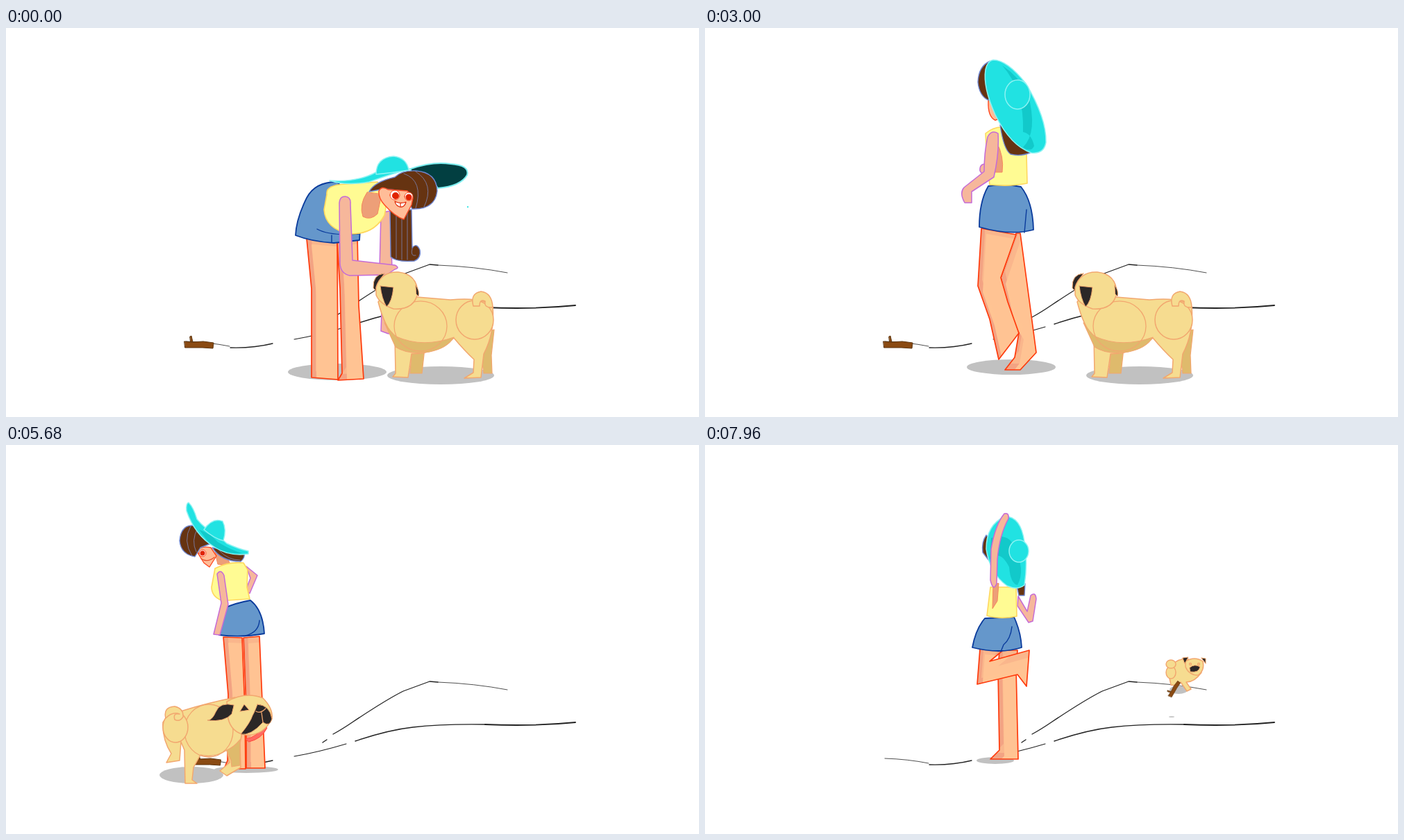
Animation of 998x561 px, one loop 8000 ms. Source, as an HTML page:

```html
<!DOCTYPE html>
<html lang="en">
<head>
<meta charset="utf-8">
<title>Fetch</title>
<style>
html, body { margin: 0; width: 100%; height: 100%; overflow: hidden; background: #fff; }
svg { display: block; width: 100vw; height: 100vh; }
path { stroke-linejoin: round; stroke-linecap: round; }
</style>
</head>
<body>
<svg id="stage" viewBox="0 0 998 561">
  <g id="ground" fill="none" stroke="#222"></g>
  <g id="cast"></g>
</svg>
<script>
const LOOP = 8000, STEP = 40, SAMPLES = 48;
const NS = "http://www.w3.org/2000/svg";
const oval = (x, y, rx, ry = rx) =>
  `M${x - rx},${y}a${rx},${ry} 0 1 1 ${2 * rx},0a${rx},${ry} 0 1 1 ${-2 * rx},0Z`;

// part name -> [fill, stroke, width, anchor part for loose details]
const STYLE = {
  shadow: ["#c1c1c1"],
  leg: ["#ffc493", "#ff3a0c", 1.7],
  shorts: ["#6597cb", "#0a3b9c", 1.8],
  shirt: ["#fffb93", "#ffd75e", 1.6],
  arm: ["#f6b79b", "#c56bd6", 1.5],
  skin: ["#ed9f78", "#f58a5c", 1],
  face: ["#ffbd98", "#ff4a22", 1.4],
  hair: ["#663311", "#6f86cf", 1.4],
  under: ["#023f41", "#7deef0", 2],
  brim: ["#21e2e2", "#8cf3f3", 1.5],
  tint: ["#12c9ca", "none", 0, "brim"],
  crown: ["#21e2e2", "#8cf3f3", 1.5],
  eyes: ["#fff", "#ff4a22", 1, "face"],
  pupils: ["#e02400", "none", 0, "face"],
  lids: ["none", "#e8502c", 1.3, "face"],
  teeth: ["#fff", "#e02400", 1.2, "face"],
  seam: ["none", "#0a3b9c", 1.4, "shorts"],
  strand: ["none", "#7d86b8", .8, "hair1"],
  lock: ["none", "#7d86b8", .8, "hair2"],
  fur: ["#f6dc90", "#f2a76f", 1.5],
  dim: ["#dfba6c", "#f2a76f", 1.2],
  fold: ["none", "#f2a76f", 1.3],
  black: ["#2b2727", "#f2a76f", 1],
  ear: ["#2b2727", "#f2a76f", 1],
  tongue: ["#ff6a62", "#ff4a3a", 1]
};

const pet = {
  ref: [477, 500],
  shadow: oval(477, 496, 71, 12),
  arm1: "M540,266L538,347L556,347L553,264Z",
  leg1: "M433,304L440,376L440,504L478,507L477,308Z",
  leg2: "M477,310L481,376L484,498L478,508L515,506L508,400L506,300Z",
  shorts: "M476,222Q445,222 433,245Q418,275 417,299Q440,308 472,310L509,306L510,290L480,225Z",
  seam: "M448,290Q466,300 508,297M469,299V309",
  hair2: "M553,262L554,330Q562,338 588,336Q598,332 596,320Q591,309 585,317L584,262Z",
  lock: "M562,265V332M570,265V334M578,265V334M585,318Q582,330 590,328",
  shirt: "M462,240Q460,226 490,225L535,222Q552,245 545,270Q530,298 495,297Q460,290 458,262Z",
  skin: "M520,237Q508,255 514,272Q525,278 535,268L541,240Z",
  arm2: "M480,252Q481,242 489,243Q497,244 496,254L499,335L560,342Q568,346 560,348L548,356L495,357Q482,354 481,340Z",
  under: "M583,203Q615,192 640,196Q668,198 664,212Q655,228 622,231Q610,212 583,207Z",
  hair1: "M523,236Q530,222 560,215Q570,205 590,206Q620,208 621,235Q618,262 585,261L570,235L545,232Z",
  strand: "M573,210Q602,220 590,260M590,207Q618,225 602,258",
  face: "M537,235Q541,227 550,233L578,235L586,245L584,255L573,276Q560,272 545,255Q536,245 537,235Z",
  eyes: oval(560, 241, 7) + oval(580, 243, 6),
  pupils: oval(561, 242, 5) + oval(580, 244, 4.5),
  teeth: "M560,250Q567,254 576,251Q574,259 567,258Q561,256 560,250ZM568,253V258",
  brim: "M466,220Q505,223 533,208L582,203Q550,212 523,222Q490,228 466,220Z",
  crown: "M533,211Q533,187 558,185Q577,187 580,205Q555,209 533,211Z"
};

const stand = {
  ref: [477, 500],
  shadow: oval(477, 496, 71, 12),
  crown: "M464,82Q478,68 491,84Q497,100 489,108Q478,95 464,82Z",
  under: "M396,72Q398,54 425,57Q462,64 487,97Q512,135 513,162Q510,180 497,177Q482,172 478,140L470,95Q440,75 410,79Q398,82 396,72Z",
  hair2: "M442,130L440,152L482,154L482,105L470,95Z",
  lock: "M474,122V152M448,138V152",
  skin: "M454,125L453,160Q460,178 469,166L468,122Z",
  leg1: "M433,296L441,380L443,476L427,494L474,494L478,480L468,380L464,300Z",
  leg2: "M464,300L478,400L481,483L465,503L519,503L508,380L504,296Z",
  shorts: "M441,236Q465,243 491,239Q508,262 516,291Q490,300 462,299Q438,297 419,289Q424,258 441,236Z",
  seam: "M451,241L450,262L458,263L459,242M443,260Q446,283 460,289L463,299",
  shirt: "M440,153Q448,148 453,152Q455,172 462,172Q470,170 469,152L480,153Q478,185 482,200L495,212L494,228Q470,237 440,231L430,224L430,190Q435,170 440,153Z",
  arm1: "M480,154Q490,155 497,180L512,215L528,263L548,256Q557,259 552,267Q540,275 524,276L505,225Q488,185 480,154Z",
  arm2: "M437,156Q445,150 441,162Q430,185 421,205L400,250Q397,258 390,257L379,243Q380,236 386,240L392,244L412,205Q424,175 437,156Z",
  hair1: "M391,105Q392,78 420,75Q450,78 468,92Q480,97 478,108L440,110Q428,131 412,131Q393,128 391,105Z",
  strand: "M418,76Q395,100 408,130M434,79Q418,100 426,126",
  face: "M432,108Q440,93 466,94L470,108Q484,110 481,120Q476,126 470,120L455,134L440,140Q430,140 432,132Z",
  lids: "M435,108Q440,98 446,107M435,111Q440,116 445,110M454,107Q460,100 466,108M454,112Q460,117 466,111M445,108L443,115H448",
  pupils: "M440,119Q445,122 449,119Q446,125 440,119Z"
};

const walk = {
  ref: [441, 490],
  shadow: oval(441, 489, 64, 11),
  leg2: "M448,296L426,360L440,420L452,440L446,475L432,493L454,493L477,468L468,400L454,296Z",
  leg1: "M398,289L393,372L410,420L423,478L452,440L436,395L426,360L448,298Z",
  face: "M408,105Q407,128 418,133L425,130L422,98Z",
  hair1: "M410,48Q394,55 393,78Q395,98 408,104L425,90Z",
  arm1: "M404,196Q395,196 396,206Q400,214 408,208Z",
  shorts: "M408,228Q430,224 455,229Q472,250 473,291Q440,300 395,287Q395,250 408,228Z",
  seam: "M460,295L463,262",
  shirt: "M404,152Q415,143 427,143L440,170L463,182L464,224Q440,229 410,226L406,190Z",
  skin: "M420,165Q431,185 428,208L416,208Z",
  hair2: "M425,140Q430,175 440,182Q455,186 470,179L472,150Z",
  arm2: "M407,157Q413,146 422,152Q424,180 416,215L384,236L384,252L374,252Q366,238 373,230L402,207Q402,180 407,157Z",
  brim: "M415,46Q435,46 462,80Q492,130 491,165Q488,182 470,180Q440,170 418,125Q400,85 404,60Q407,47 415,46Z",
  tint: "M428,54Q460,90 458,150Q470,152 474,170Q470,180 458,172Q480,150 465,95Q452,70 428,54Z",
  crown: oval(450, 96, 18, 21)
};

const look = {
  ref: [341, 466],
  shadow: oval(346, 468, 46, 5),
  leg1: "M313,277L320,360L319,455L314,467L345,467L344,380L340,278Z",
  leg2: "M342,278L346,380L346,466L373,466L369,370L365,276Z",
  skin: "M308,138L318,163L332,168L326,145Z",
  hair2: "M313,125L327,160Q340,175 352,165L351,158Q335,145 313,125Z",
  lock: "M322,140Q330,162 345,169",
  shorts: "M315,235Q330,228 352,224Q370,238 372,272Q340,278 307,274Q308,250 315,235Z",
  seam: "M365,253Q364,270 345,275",
  shirt: "M308,165Q316,158 322,165L346,168L348,190L344,212L351,224L314,234L305,220Q303,190 308,165Z",
  arm2: "M308,170Q313,164 321,172Q338,188 351,204L328,232Q320,244 314,241Q310,236 322,222L334,205L315,190Q306,180 308,170Z",
  face: "M288,118Q293,112 303,117L315,128L316,138Q305,150 297,152L291,147L290,135Z",
  eyes: oval(295, 128, 5.5),
  pupils: oval(295, 128, 3.8),
  lids: "M291,141L297,139M308,126Q314,122 313,131",
  hair1: "M259,112Q262,93 281,93Q298,98 310,118L292,121Q290,138 276,138Q260,132 259,112Z",
  strand: "M277,94Q262,115 276,137M287,97Q276,115 286,133",
  brim: "M265,75Q280,84 300,92Q325,95 336,103Q338,125 345,138L352,158Q340,155 318,133Q300,110 280,96Q265,84 265,75Z",
  tint: "M292,102Q320,112 348,152Q330,145 314,128Z",
  crown: "M305,98Q318,90 330,95Q338,103 336,118Q320,115 305,98Z"
};

const peek = {
  arm1: "M346,175L362,188L351,214L345,210L352,192Z",
  ...look,
  skin: "M301,155L305,172L324,174L315,155Z",
  hair2: "M297,148Q310,168 338,168Q345,162 343,155Z",
  lock: "M308,153Q320,166 337,166",
  shirt: "M301,178Q320,168 342,170L348,180L347,205L351,222L320,224L310,224Q296,218 296,205Z",
  arm2: "M304,186Q309,178 314,188L320,230L308,274L299,273L310,228Z",
  face: "M274,152Q282,145 295,148L303,160L293,176L285,170L280,162Z",
  eyes: oval(283, 156, 5),
  pupils: oval(283, 156, 3.5),
  lids: "M281,164Q290,170 300,162",
  hair1: "M250,138Q252,116 268,116Q285,120 295,142L280,148L272,161Q252,158 250,138Z",
  strand: "M266,117Q254,138 268,160M276,120Q266,138 274,154",
  brim: "M263,83Q270,90 275,107Q287,122 300,126L318,142Q335,150 349,153L349,157Q320,161 300,147Q272,130 260,95Q259,84 263,83Z",
  tint: "M278,122Q295,128 305,140Q325,152 340,156Q310,158 290,138Z",
  crown: "M285,122Q298,104 312,110Q318,122 313,138Q300,135 285,122Z"
};

const bend = {
  ref: [384, 460],
  shadow: "M316,467Q340,455 450,453Q430,465 352,468Q320,471 316,467Z",
  arm1: "M356,269L382,268L380,276L362,277Z",
  leg1: "M371,312L330,451L317,455L352,467L400,323Z",
  leg2: "M409,322L421,444L412,453L452,453L437,320Z",
  skin: "M358,268Q372,272 378,282L370,308L355,300Z",
  shorts: "M385,262Q405,246 425,259Q434,272 436,320L404,326L367,308Q375,280 385,262Z",
  seam: "M404,326L407,309L412,304",
  hair2: "M310,305L340,328L330,368Q320,377 293,374L303,335Z",
  hair1: "M300,308L320,290L330,300L322,318L296,350Q285,345 288,335Z",
  strand: "M320,295L296,346",
  lock: "M324,318L308,372M332,324L320,372M275,362Q285,358 290,368Q285,377 276,370Z",
  shirt: "M322,280L342,266L360,261L361,270Q372,290 372,318Q355,324 345,320Q325,310 322,280Z",
  brim: "M313,237Q325,240 326,265Q325,285 318,290Q300,310 285,335L266,371Q258,350 272,325Q285,300 304,285Q308,270 305,250Q306,238 313,237Z",
  crown: "M300,292Q308,282 318,288Q324,300 316,308Q304,308 300,292Z",
  arm2: "M338,298Q342,289 350,295Q352,300 347,308L331,343L314,380Q314,390 306,391Q300,388 304,375Z"
};

const thrown = {
  ref: [418, 453],
  shadow: oval(418, 455, 27, 5),
  leg2: "M422,325L424,440L411,453L451,453L448,322L450,296H424Z",
  leg1: "M396,294L392,345L450,331L463,348L467,296L410,312L428,297Z",
  arm1: "M451,218L464,240L469,217Q476,211 477,222L472,254L466,256L450,232Z",
  hair1: "M405,130Q398,140 400,155L410,168L415,140Z",
  hair2: "M449,203L452,217L460,217L461,200Z",
  shorts: "M403,250L445,248Q455,270 456,292Q425,302 385,292Q390,265 403,250Z",
  seam: "M442,262Q440,280 430,288L426,298",
  shirt: "M411,205L448,205L449,247Q425,252 406,246Z",
  skin: "M415,200L414,236L421,225L423,200Z",
  brim: "M432,103Q455,103 460,140Q465,170 460,202Q450,210 435,203Q410,185 405,150Q405,115 432,103Z",
  tint: "M412,134Q440,126 446,150Q462,180 450,202Q440,200 438,176Q425,150 410,165Z",
  crown: oval(452, 153, 14, 16),
  arm2: "M431,99Q438,97 437,106Q424,130 421,165L420,200Q415,212 411,195L412,150Q418,115 431,99Z"
};

const windup = {
  ...thrown,
  ref: bend.ref, shadow: bend.shadow, leg1: bend.leg1, leg2: bend.leg2,
  arm2: "M414,206Q424,210 416,219L330,198L250,152Q240,142 252,141L335,184Z"
};

const dogIdle = {
  ref: [626, 503],
  shadow: oval(626, 501, 77, 13),
  dim1: "M585,455L582,498L599,498L603,462Z",
  dim2: "M680,440L688,498L700,498L699,472L703,435Z",
  black: "M545,354Q528,355 529,375L538,385Q535,365 545,354Z",
  fur1: "M536,395Q545,430 560,447L561,498L557,503L579,504L584,470Q620,470 645,447Q660,465 674,478L673,497L660,505L684,504L688,470Q704,440 701,402Q690,388 640,392L592,388L560,365Z",
  dim3: "M545,425Q555,440 562,445Q600,462 645,446Q635,462 610,467Q580,472 561,460Z",
  fold1: oval(597, 430, 38, 36),
  fur2: oval(675, 421, 27, 28),
  fur3: "M673,401Q668,383 684,380Q700,382 701,403Q688,404 690,394Q682,390 682,401Z",
  fur4: "M533,374Q540,351 565,352Q592,355 593,382Q588,407 558,405Q538,398 533,385Z",
  ear: "M539,372L558,374Q556,395 548,402Q541,390 539,372Z",
  ear2: "M590,371Q596,379 594,387L591,384Z"
};

const wavy = "q-6,9 0,17q-6,9 0,17q-6,9 0,17q-5,9 0,17";
const dogBow = {
  ref: [626, 503],
  shadow: oval(630, 501, 74, 13),
  dim2: `M692,400${wavy}l3,22l-12,6l-2,-14Z`,
  fur1: "M645,395Q668,395 668,410Q660,440 662,470Q645,495 610,495L575,492L588,440Q615,415 632,415Z",
  fur5: `M688,402${wavy}q0,14 -7,20l3,12h-18l8,-16q-6,-8 0,-18q-6,-8 0,-16q-5,-8 -2,-18q-5,-12 4,-30Z`,
  dim3: "M662,425Q658,470 645,483Q625,497 604,490Q640,468 662,425Z",
  fur2: oval(673, 386, 25, 24),
  fur3: "M649,377Q638,380 635,370Q637,355 662,354Q690,358 697,376L690,385L664,384Q644,362 649,377Z",
  fur4: "M560,450Q562,432 578,429Q598,428 606,440Q608,468 592,482Q570,488 560,470Z",
  fold1: "M602,430Q582,445 588,480Q586,450 602,430Z",
  black: "M555,450L561,456Q570,472 566,483L557,480Z",
  fur6: "M557,501Q570,487 592,478Q612,462 622,462Q605,482 592,493Q580,501 557,501Z"
};

const dogSniff = {
  ref: [212, 460],
  shadow: oval(212, 458, 55, 8),
  fur1: "M152,385Q160,376 180,378Q215,392 236,412L250,420L245,448L228,450Q222,446 200,430L192,428Q180,430 168,452L160,462L146,462L152,447Q158,430 151,410Z",
  dim3: "M192,428Q205,434 216,446L204,454L230,456L240,435L220,420Z",
  fur2: oval(170, 398, 18, 19),
  fur3: "M160,384Q156,371 170,369Q182,371 180,381Q170,384 172,376Q164,376 166,383Z",
  fur4: "M233,425Q240,412 258,415Q272,420 273,440Q270,458 252,460Q235,455 233,440Z",
  black: "M242,450Q255,443 267,458L255,461Q245,460 242,450Z",
  ear: "M250,430Q262,426 264,420Q270,428 267,432Z"
};

const dogRun = {
  ref: [300, 488],
  shadow: oval(267, 476, 46, 12),
  fur1: "M226,400Q235,385 255,383Q290,372 330,364Q345,400 337,430L338,465L318,477L308,470L322,458L318,440Q300,452 280,447L270,465L268,483L275,488L258,488L257,440L252,428L250,455L231,458L238,445Q225,425 226,400Z",
  dim3: "M318,440Q328,436 337,425L337,462L325,464L324,455Z",
  fold1: oval(292, 412, 35, 38),
  fur2: oval(244, 407, 18, 22),
  fur3: "M230,394Q226,378 243,377Q256,380 255,392Q250,400 243,396Q240,386 250,388Q240,384 230,394Z",
  tongue: "M345,424Q362,422 372,403L376,408Q368,424 350,428Z",
  fur4: "M318,370Q345,355 370,365Q385,380 383,395Q370,420 345,418Q325,415 320,395Z",
  black: "M362,374Q380,375 383,395Q380,407 370,400Q352,420 338,417Q352,400 355,390Q358,385 362,374Z",
  fold2: "M360,384Q366,388 374,380M368,386L370,400",
  ear: "M328,375Q308,370 302,385Q297,397 290,397Q315,400 325,388Z",
  ear2: "M337,384L343,374L350,382Z"
};

const dogFar = {
  ref: [682, 353],
  shadow: oval(682, 353, 13, 6),
  fur1: "M672,318Q680,308 695,308L715,328Q705,342 693,342L700,352L694,355L685,342L680,347L671,346L668,332Z",
  fur2: oval(671, 328, 7, 9),
  fur3: oval(671, 316, 7, 6),
  fur4: "M692,312Q705,304 717,312Q720,325 710,332Q697,332 692,320Z",
  black: "M698,321Q705,315 713,320Q711,329 699,327Z",
  ear: "M688,307L696,306L691,315Z",
  ear2: "M715,307L721,308L721,315Z",
  fold1: oval(699, 316, 1.5),
  fold2: oval(711, 316, 1.5)
};

// [time, pose, dx, dy, scaleX, scaleY, overshoot]
const girlKeys = [
  [0, pet], [160, pet, 0, 0, 1, 1, 1.6], [940, stand], [1100, stand, 0, -1], [1200, stand], [1400, stand],
  [1720, stand, 0, 2], [2000, stand], [2240, stand], [2640, walk, 16, 5], [2960, walk], [3120, walk],
  [3500, look, 46, 12, 1.06, 1.06], [3900, walk, -62, -10, .94, .94], [4360, look], [5400, look],
  [5640, peek], [6280, peek], [6960, bend], [7080, bend], [7380, windup], [7520, windup], [7840, thrown], [LOOP, thrown]
];
const dogKeys = [
  [0, dogIdle], [1400, dogIdle], [1840, dogBow], [2240, dogBow], [2760, dogIdle], [3160, dogIdle],
  [3160, dogRun, 300, 15, -1, 1], [3960, dogRun, -104, -20, -.85, .85],
  [3960, dogSniff, -6, -4], [4320, dogSniff], [4920, dogSniff], [4960, dogSniff, 2, -1], [5000, dogSniff], [5400, dogSniff],
  [5640, dogRun], [5720, dogRun], [6200, dogRun, 160, 20, 1.05, 1.05], [6600, dogRun, 343, -144, .2, .2]
];
const farKeys = [[7360, dogFar, 14, -2, .5, .5], [7600, dogFar, 6, 0], [7760, dogFar, 0, -10], [7880, dogFar], [LOOP, dogFar]];
// [time, x, y, angle, scale]
const stickKeys = [
  [0, 278, 457, 0, 1], [4200, 278, 457, 0, 1], [4480, 288, 457, 0, 1], [6760, 289, 457, 0, 1], [6960, 306, 386, -14, 1],
  [7080, 306, 386, -14, 1], [7240, 140, 320, -80, 1], [7360, 60, 180, -170, 1], [7480, 230, 30, -260, 1],
  [7640, 470, 60, -340, .8], [7840, 676, 352, -420, .6], [LOOP, 676, 352, -420, .6]
];

const lerp = (a, b, k) => a + (b - a) * k;
const smooth = k => k * k * (3 - 2 * k);
const backOut = (k, s) => 1 + (s + 1) * (k - 1) ** 3 + s * (k - 1) ** 2;

function span(keys, t) {
  let i = keys.length - 1;
  while (i > 0 && keys[i][0] > t) i--;
  const a = keys[i], b = keys[i + 1] || a;
  return [a, b, b === a ? 0 : (t - a[0]) / (b[0] - a[0])];
}

const probe = document.createElementNS(NS, "path");
const sampled = new Map(), aligned = new Map();
function sample(d) {
  if (!sampled.has(d)) {
    probe.setAttribute("d", d);
    const len = probe.getTotalLength();
    const pts = Array.from({ length: SAMPLES }, (_, i) => {
      const p = probe.getPointAtLength(len * i / SAMPLES);
      return [p.x, p.y];
    });
    sampled.set(d, pts);
  }
  return sampled.get(d);
}
const centre = pts => [0, 1].map(j => pts.reduce((s, p) => s + p[j], 0) / pts.length);

// turn and, if needed, reverse the second outline so that it best follows the first
function align(d1, d2) {
  const id = d1 + "|" + d2;
  if (!aligned.has(id)) {
    const a = sample(d1), b = sample(d2), ca = centre(a), cb = centre(b);
    let best = Infinity, pick = b;
    for (const list of [b, [...b].reverse()]) {
      for (let r = 0; r < SAMPLES; r++) {
        let cost = 0;
        for (let i = 0; i < SAMPLES; i++) {
          const p = a[i], q = list[(i + r) % SAMPLES];
          cost += (p[0] - ca[0] - q[0] + cb[0]) ** 2 + (p[1] - ca[1] - q[1] + cb[1]) ** 2;
        }
        if (cost < best) { best = cost; pick = a.map((_, i) => list[(i + r) % SAMPLES]); }
      }
    }
    aligned.set(id, pick);
  }
  return aligned.get(id);
}
function morph(d1, d2, k) {
  if (d1 === d2 || k === 0) return d1;
  if (k === 1) return d2;
  const a = sample(d1), b = align(d1, d2);
  return "M" + a.map((p, i) => lerp(p[0], b[i][0], k).toFixed(1) + "," + lerp(p[1], b[i][1], k).toFixed(1)).join("L") + "Z";
}

const draw = (d, [fill, stroke = "none", width = 0], extra = "") =>
  `<path d="${d}" fill="${fill}" stroke="${stroke}" stroke-width="${width}" ${extra}/>`;

function part(name, d, shift) {
  const style = STYLE[name.replace(/\d/, "")];
  if (name.startsWith("leg")) {
    return `<clipPath id="${name}"><path d="${d}"/></clipPath>` + draw(d, ["#f3a383"]) +
      `<g clip-path="url(#${name})">${draw(d, [style[0], style[0], 2], 'transform="translate(8 9)"')}` +
      draw(d, [style[0]], 'transform="translate(6 -9)" opacity=".6"') + "</g>" + draw(d, ["none", style[1], style[2]]);
  }
  return draw(d, style, shift ? `transform="translate(${shift})"` : "");
}

function actor(keys, t, bob = 0) {
  const [a, b, raw] = span(keys, t);
  const k = a[6] ? backOut(raw, a[6]) : smooth(raw);
  const from = a[1], to = b[1], main = k < .5 ? from : to;
  const mid = j => lerp(a[j] ?? (j > 3 ? 1 : 0), b[j] ?? (j > 3 ? 1 : 0), k);
  const [rx, ry] = [0, 1].map(j => lerp(from.ref[j], to.ref[j], k));
  let out = "";
  for (const name in main) {
    if (name === "ref") continue;
    const anchor = STYLE[name.replace(/\d/, "")][3];
    const base = anchor || name;
    const paired = from[base] && to[base];
    if (!anchor) {
      out += part(name, paired ? morph(from[name], to[name], k) : main[name]);
    } else if (paired) {
      const p = centre(sample(from[base])), q = centre(sample(to[base])), own = main === from ? p : q;
      out += part(name, main[name], [0, 1].map(j => lerp(p[j], q[j], k) - own[j]).join(" "));
    } else out += part(name, main[name]);
  }
  return `<g transform="translate(${rx + mid(2)} ${ry + mid(3) - bob}) scale(${mid(4)} ${mid(5)}) translate(${-rx} ${-ry})">${out}</g>`;
}

function stick(t) {
  const [a, b, k] = span(stickKeys, t);
  const [x, y, turn, size] = [1, 2, 3, 4].map(j => lerp(a[j], b[j], k));
  const wood = ["#8a4a12", "#5c3510", 1];
  return `<g transform="translate(${x} ${y}) rotate(${turn}) scale(${size})">` +
    draw("M-12,-4L-9,-4L-11,-13L-13,-12Z", wood) + draw("M-21,-5L-10,-4L6,-5L21,-3L20,5L5,4L-20,4Z", wood) + "</g>";
}

// leap streak: dashes stand for the two breaks in the brush line
const streak = "M643,344Q609,324 583,282Q569,225 588,196Q605,165 640,147Q690,122 718,120Q752,119 768,144Q778,160 778,183Q777,210 768,234Q755,262 712,334";
function trail(t) {
  if (t < 6600 || t >= 7400) return "";
  const head = Math.min(1, (t - 6600) / 360), tail = Math.max(0, (t - 7080) / 320);
  probe.setAttribute("d", streak);
  const len = probe.getTotalLength();
  const stretch = (u, v, w) => {
    const s = Math.max(u, tail), e = Math.min(v, head);
    return e <= s ? "" : draw(streak, ["none", "#f79a62", w], `stroke-dasharray="0 ${s * len} ${(e - s) * len} ${len}"`);
  };
  const tip = probe.getPointAtLength(len * head);
  return stretch(0, .675, 1.8) + stretch(.705, .795, 1.8) + stretch(.815, 1, 2.8) +
    `<g transform="translate(${tip.x - 712} ${tip.y - 334})">` +
    draw("M712,333Q698,332 695,345Q697,352 706,350Q714,344 712,333Z", ["#f8d588", "#f79a62", 1.8]) +
    draw("M697,344Q703,350 710,346Q705,352 698,350Z", ["#f7a468"]) + "</g>";
}

document.getElementById("ground").innerHTML = [
  ["M456,429L462,425", 1.4],
  ["M471,417Q484,410 500,399Q548,367 572,355L610,341L622,342", 1.3],
  ["M622,342Q675,344 722,353", .8],
  ["M415,449Q450,443 490,431", 1.1],
  ["M503,427Q550,411 586,407Q630,402 690,403", 1.4],
  ["M690,403Q760,406 820,400", 1.9],
  ["M259,452Q292,453 322,459", .8],
  ["M323,461Q356,462 384,455", 1.3]
].map(([d, w]) => `<path d="${d}" stroke-width="${w}"/>`).join("");

function scene(t) {
  const running = (t > 3160 && t < 3960) || (t > 5720 && t < 6600);
  const bob = running ? Math.abs(Math.sin(t / 75)) * 7 : 0;
  const inHand = t >= 6760;
  let out = inHand ? "" : stick(t);
  if (t < 160) out += draw(oval(665, 258, 1.2), ["#4be8e8"]);
  if (t < 1000) out += draw("M541,408L540,437L551,441L562,420Z", STYLE.arm);
  out += trail(t) + actor(girlKeys, t);
  if (t < 6600) out += actor(dogKeys, t, bob);
  if (t >= 7360) out += actor(farKeys, t);
  if (t >= 7760) out += draw(oval(672, 392, 4, 1), ["#c8c8c8"]);
  return out + (inHand ? stick(t) : "");
}

const cast = document.getElementById("cast");
let shown = -1;
function frame() {
  const t = Math.floor(performance.now() % LOOP / STEP) * STEP;
  if (t !== shown) cast.innerHTML = scene(shown = t);
  requestAnimationFrame(frame);
}
frame();
</script>
</body>
</html>
```
